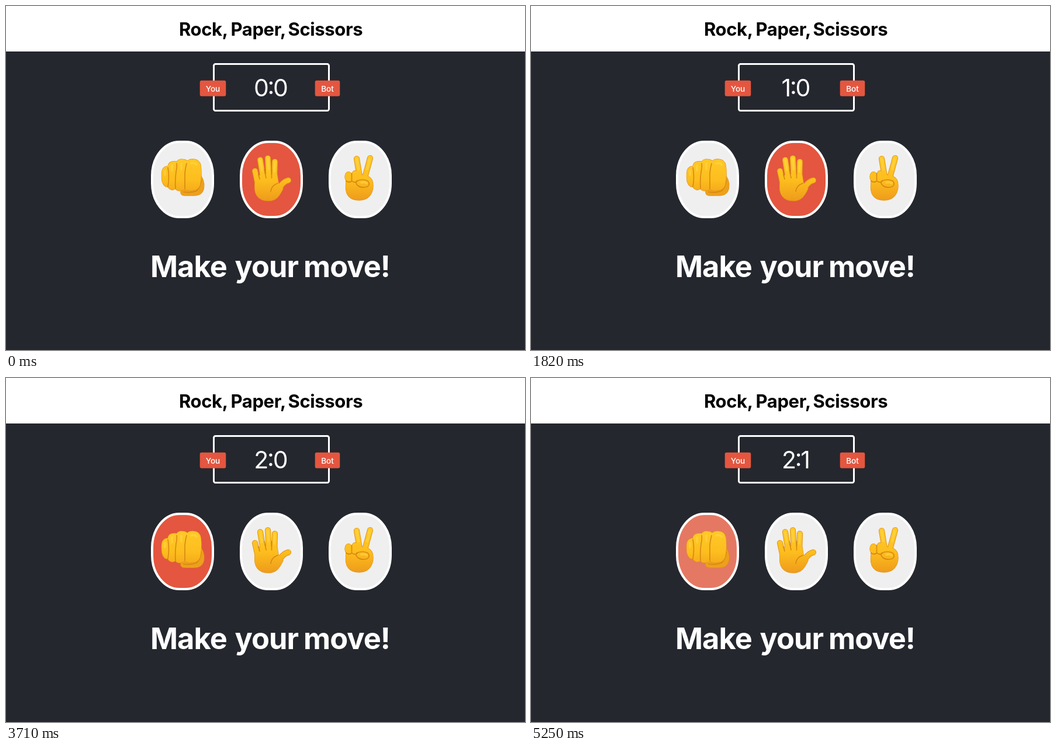
These frames come from a looping animation (888x590 px, 5320 ms). An HTML page:

```html
<!DOCTYPE html>
<html lang="en">
<head>
<meta charset="utf-8">
<title>Rock, Paper, Scissors</title>
<style>
  html, body { margin: 0; width: 100%; height: 100%; overflow: hidden; background: #24272e; }
  svg { display: block; width: 100%; height: 100%; --red: #e4563f; --grey: #efefef; }

  text {
    font-family: Inter, Roboto, sans-serif;
    font-optical-sizing: none;
    fill: #fff;
  }
  .title { font-size: 31px; font-weight: 700; letter-spacing: -.012em; fill: #000; }
  .prompt { font-size: 50.5px; font-weight: 700; letter-spacing: -.019em; }
  .score { font-size: 41px; letter-spacing: -.055em; font-feature-settings: "case"; text-anchor: middle; }
  .label { font-size: 13.6px; font-weight: 500; letter-spacing: -.01em; text-anchor: middle; }
  .badge { fill: var(--red); }

  .pill { stroke: #fff; stroke-width: 4; animation: 5320ms ease infinite; }
  .rock { animation-name: rock; }
  .paper { animation-name: paper; }
  .scissors { animation-name: scissors; }

  @keyframes rock {
    0%, 49.53% { fill: var(--grey); }
    55.17%, 76.5% { fill: var(--red); }
    82.14%, 87.65% { fill: var(--grey); }
    93.29%, 97.78% { fill: var(--red); }
    98.68% { fill: #e57863; }
    100% { fill: #e78c7c; }
  }
  @keyframes paper {
    0%, 6.86% { fill: var(--red); }
    12.5%, 24.77% { fill: var(--grey); }
    30.41%, 39.66% { fill: var(--red); }
    45.3%, 100% { fill: var(--grey); }
  }
  @keyframes scissors {
    0%, 7.8% { fill: var(--grey); }
    13.44%, 23.76% { fill: var(--red); }
    29.4%, 100% { fill: var(--grey); }
  }

  /* Each hand is drawn twice: a darker rim, then the skin on top. */
  .rim { fill: #e0931a; stroke: #e0931a; --finger: 10.2px; --edge: 1.4px; }
  .skin { fill: url(#skin); stroke: url(#skin); --finger: 8.2px; --edge: 0px; }
  .shade { fill: #eda01c; stroke: none; --edge: 0px; }
  .finger { fill: none; stroke-width: var(--finger); stroke-linecap: round; stroke-linejoin: round; }
  .body { stroke-width: var(--edge); stroke-linejoin: round; }
  .crease { fill: none; stroke: #cf7f0e; stroke-width: 1.7; stroke-linecap: round; opacity: .8; }
  .shine { fill: none; stroke: #ffd94a; stroke-width: 3.5; stroke-linecap: round; opacity: .55; }
</style>
</head>
<body>
<svg viewBox="0 0 888 590" preserveAspectRatio="none">
  <defs>
    <linearGradient id="skin" gradientUnits="userSpaceOnUse" x1="0" y1="256" x2="0" y2="334">
      <stop offset="0" stop-color="#ffcb2a"/>
      <stop offset=".55" stop-color="#fdbd1e"/>
      <stop offset="1" stop-color="#ee9b1b"/>
    </linearGradient>

    <rect id="pill" width="104" height="129" rx="46.6" ry="58"/>

    <path id="wrist" class="body" d="M329 286C336 293 340 302 338.500 312C337 321 331 325 322 325H306C299 325 297 320 301 314Z"/>
    <path id="fist" class="body" d="M267 300C266 290 266 284 268 280Q271 275 277 275Q278 268 284 267Q289 266 292 267Q296 262 302 263Q307 263 310 266Q315 262 322 263Q331 264 333 273C335 285 334 297 332 307Q329 316 320 316Q311 318 306 314Q302 317 297 317Q292 317 290 313Q287 316 283 315Q279 314 277 310Q270 311 267 300Z"/>

    <g id="palm">
      <path class="body" d="M426 297C426 310 424 318 430 326Q436 334 449 334C462 334 468 326 474 313L466 303L464 290L437 288Z"/>
      <path class="finger" d="M426 283L431 306"/>
      <path class="finger" d="M435 264L441 302"/>
      <path class="finger" d="M448 261L450 302"/>
      <path class="finger" d="M460 267L459 302"/>
      <path class="finger" d="M483 299Q475 301 470 309L463 318"/>
    </g>

    <g id="victory">
      <path class="finger" d="M600 262L606 298"/>
      <path class="finger" d="M623 261L613 298"/>
      <path class="body" d="M582 300C581 314 581 320 586 326Q592 333 604 333C620 333 628 322 628 308Q628 296 619 292L600 288Z"/>
      <ellipse class="body" cx="586" cy="293" rx="6" ry="8.5"/>
      <ellipse class="body" cx="597" cy="292" rx="6" ry="9.5"/>
    </g>
  </defs>

  <rect width="888" height="590" fill="#24272e"/>
  <rect width="888" height="78" fill="#fff"/>
  <text class="title" y="51"><tspan x="296">Rock,</tspan> <tspan x="384.500">Paper,</tspan> <tspan x="482.500">Scissors</tspan></text>

  <rect x="355.500" y="99.500" width="197" height="80" rx="3" fill="none" stroke="#fff" stroke-width="3"/>
  <rect class="badge" x="331.700" y="127.700" width="44.600" height="27" rx="3"/>
  <rect class="badge" x="528.700" y="127.700" width="42.600" height="27" rx="3"/>
  <text class="label" x="354" y="146.500">You</text>
  <text class="label" x="550" y="146.500">Bot</text>
  <text class="score" id="score" x="452.300" y="155">0:0</text>

  <use href="#pill" x="250" y="233" class="pill rock"/>
  <use href="#pill" x="402" y="233" class="pill paper"/>
  <use href="#pill" x="554" y="233" class="pill scissors"/>

  <g>
    <use href="#wrist" class="rim"/>
    <use href="#wrist" class="shade"/>
    <path class="crease" d="M304 319Q317 321 326 317Q333 311 334 298"/>
    <use href="#fist" class="rim"/>
    <use href="#fist" class="skin"/>
    <path class="crease" d="M277 277Q280 293 277 310M292 270Q293 276 291 284Q289 300 290 313M309 270Q306 282 306 290V313"/>
    <path class="shine" d="M272 283V290M284 273V282M300 270V280M317 270Q322 268 326 272"/>
  </g>

  <g>
    <use href="#palm" class="rim"/>
    <use href="#palm" class="skin"/>
    <path class="crease" d="M432 289L434 297M442 280L445 295M454.500 280V295M465 304Q454 308 453 318"/>
    <path class="shine" d="M435 265L438 282M448 262L449 280M460 268L459 284"/>
  </g>

  <g>
    <use href="#victory" class="rim"/>
    <use href="#victory" class="skin"/>
    <path class="crease" d="M591.500 287V299M582 300Q587 304 592 300Q597 305 603 299M600 300Q610 296 619 300Q624 306 618 310Q608 313 602 308Q597 304 600 300"/>
    <path class="shine" d="M600 263L603 280M622 263L618 280M608 303Q613 301 617 304"/>
  </g>

  <text class="prompt" y="465"><tspan x="247">Make</tspan> <tspan x="391.500">your</tspan> <tspan x="509">move!</tspan></text>
</svg>
<script>
  const LOOP = 5320, STEP = 70;
  const score = document.getElementById('score');
  const fades = document.getAnimations();
  fades.forEach(fade => fade.pause());

  function draw() {
    const time = Math.floor(performance.now() % LOOP / STEP) * STEP;
    const you = (time >= 910) + (time >= 3080);
    const bot = +(time >= 3850);
    fades.forEach(fade => { fade.currentTime = time; });
    score.textContent = you + ':' + bot;
    requestAnimationFrame(draw);
  }
  draw();
</script>
</body>
</html>
```
